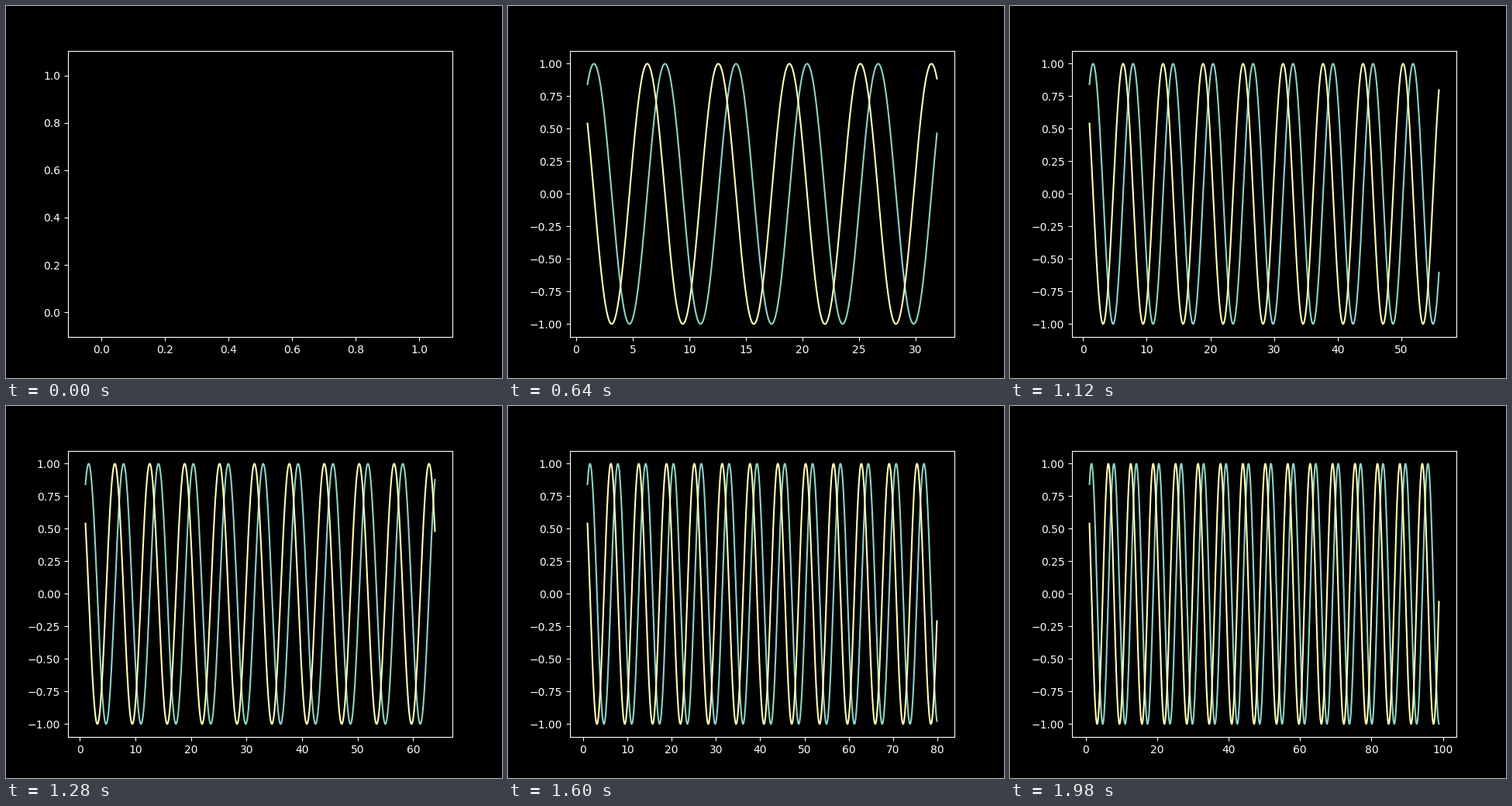
Animation, 640 px wide and 480 px high, one loop 2000 ms. Source, as a matplotlib script:

```python
import numpy as np
import matplotlib.pyplot as plt
from matplotlib.animation import FuncAnimation

FRAMES = 100
INTERVAL = 20  # ms
EMPTY_LIMITS = (-0.105, 1.105)

plt.style.use("dark_background")
fig, ax = plt.subplots(figsize=(6.4, 4.8), dpi=100)


def update(i):
    """Plot sine and cosine from 1 up to i, with freshly fitted axes."""
    ax.clear()
    x = np.arange(1, i, 0.1)
    if x.size == 0:
        ax.set(xlim=EMPTY_LIMITS, ylim=EMPTY_LIMITS)
        return
    ax.plot(x, np.sin(x))
    ax.plot(x, np.cos(x))


anim = FuncAnimation(fig, update, frames=FRAMES, interval=INTERVAL,
                     init_func=lambda: update(0), repeat=True, repeat_delay=0)
plt.show()
```
